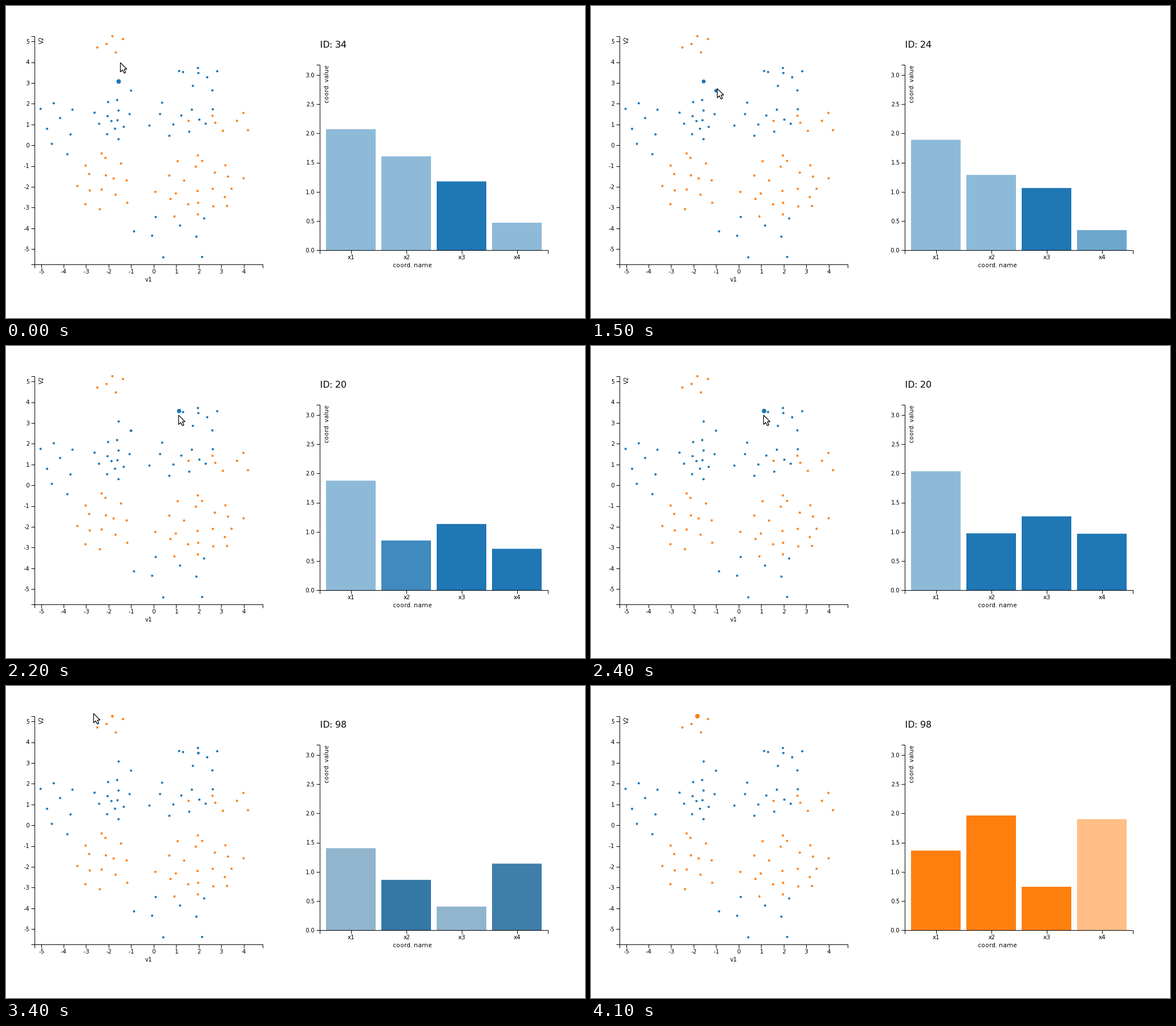
Animation, 1015 px wide and 547 px high, one loop 4.3 s. Source, as a matplotlib script:

```python
import numpy as np
import matplotlib.pyplot as plt
from matplotlib.animation import FuncAnimation
from matplotlib.colors import to_rgb
from matplotlib.patches import Polygon, Rectangle

W, H, DPI = 1015, 547, 100
PX = 72 / DPI  # points per pixel
STEP, LOOP = 100, 4300
HOLD = (2400, 3000)  # the scene clock stands still here, then jumps ahead
BAR_MS, GROW_MS, SHRINK_MS = 500, 400, 500
SMALL, LARGE = 2.0, 4.0
BLUE, ORANGE = np.array(to_rgb("#1f77b4")), np.array(to_rgb("#ff7f0e"))

# Whole-pixel glyph advances, as a browser sets small text.
plt.rcParams.update({"font.family": "DejaVu Sans", "text.hinting_factor": 1})

# Hover events: start, end, id, dot position, colour, signed coordinates.
# Negative coordinates are drawn as pale bars.
HOVERS = [
    (-1000, 1290, 34, (-1.567, 3.085), BLUE, (-2.077, -1.612, 1.182, -0.474)),
    (1290, 1880, 24, (-1.017, 2.64), BLUE, (-1.466, -0.5375, 0.801, 0.049)),
    (1906, 2660, 20, (1.12, 3.588), BLUE, (-2.042, 0.978, 1.269, 0.971)),
    (2660, 3085, 54, (1.975, 3.49), BLUE, (-1.413, 0.747, -0.372, 1.062)),
    (3255, LOOP, 98, (-1.845, 5.264), ORANGE, (1.368, 1.969, 0.7475, -1.9055)),
]

# Dot clouds: colour, count, centre, radii.
CLOUDS = [
    (BLUE, 13, (-1.85, 1.25), (0.85, 1.0)),
    (BLUE, 6, (2.1, 3.4), (0.95, 0.8)),
    (BLUE, 11, (1.1, 1.25), (1.75, 0.9)),
    (BLUE, 8, (-4.3, 1.1), (1.0, 1.6)),
    (BLUE, 8, (0.8, -4.2), (1.9, 1.4)),
    (ORANGE, 4, (-1.8, 4.8), (0.85, 0.55)),
    (ORANGE, 7, (3.0, 1.2), (1.5, 0.6)),
    (ORANGE, 23, (2.0, -2.0), (2.0, 1.8)),
    (ORANGE, 15, (-2.2, -1.7), (1.4, 1.6)),
]

# Pointer: where the tip rests first, then moves as start, end, destination.
REST = (200, 99)
MOVES = [
    (400, 800, (203, 133)), (1100, 1200, (207.5, 136)),
    (1200, 1700, (228, 149)), (1800, 2000, (302, 121)),
    (2900, 3000, (332, 101)), (3000, 3400, (153, 48)),
    (3500, 4000, (81, 1)),
]
POINTER_GONE = 4100
ARROW = np.array([(0.5, 0.3), (0.5, 16.5), (4.3, 13), (7, 18.6),
                  (9.7, 17.4), (7.2, 11.8), (11.8, 11.5)])


def scatter_x(v):
    return 259.3 + 39.45 * v


def scatter_y(v):
    return 244.6 - 36.4 * v


def bar_y(v):
    return 428.5 - 102.33 * v


def ease(t):
    """Cubic in-out, clamped to 0..1."""
    t = min(max(t, 0), 1)
    return 4 * t**3 if t < 0.5 else 1 - 4 * (1 - t) ** 3


def smooth(t):
    t = min(max(t, 0), 1)
    return t * t * (3 - 2 * t)


def cloud(rng, count, center, radii):
    """Jittered golden-angle spiral filling an ellipse."""
    k = np.arange(count)
    r = np.sqrt((k + 0.5) / count)
    angle = k * np.pi * (3 - np.sqrt(5)) + rng.uniform(0, 2 * np.pi)
    unit = np.column_stack([r * np.cos(angle), r * np.sin(angle)])
    unit += rng.uniform(-0.12, 0.12, unit.shape)
    return np.array(center) + unit * radii


fig = plt.figure(figsize=(W / DPI, H / DPI), dpi=DPI, facecolor="white")
ax = fig.add_axes([0, 0, 1, 1])
ax.set(xlim=(0, W), ylim=(H, 0))
ax.axis("off")


def line(xs, ys):
    # The offset makes snapping choose the pixel that holds the coordinate.
    ax.plot(np.array(xs) - 0.49, np.array(ys) - 0.49, color="black", lw=PX,
            solid_capstyle="butt", solid_joinstyle="miter", snap=True, zorder=2)


def label(x, y, text, size=10, ha="center", rotation=0):
    return ax.text(x, y, text, fontsize=size * PX, ha=ha, va="baseline",
                   rotation=rotation, rotation_mode="anchor", zorder=2)


def left_axis(x, top, bottom, ticks, name):
    line([x - 6, x, x, x - 6], [top, top, bottom, bottom])
    for y, text in ticks:
        line([x - 6, x], [y, y])
        label(x - 9, y + 3.4, text, ha="right")
    label(x + 15.5, top - 1, name, ha="right", rotation=90)


def bottom_axis(y, left, right, ticks, name, name_x):
    line([left, left, right, right], [y + 6, y, y, y + 6])
    for x, text in ticks:
        line([x, x], [y, y + 6])
        label(x, y + 15.6, text)
    label(name_x, y + 29.5, name)


left_axis(50.5, 53.5, 453.5,
          [(scatter_y(v), str(v)) for v in range(-5, 6)], "V2")
bottom_axis(453.5, 50.5, 450.5,
            [(scatter_x(v), str(v)) for v in range(-5, 5)], "v1", 250)
left_axis(550.5, 103.5, 428.5,
          [(bar_y(v), f"{v:.1f}") for v in np.arange(0, 3.1, 0.5)],
          "coord. value")
bottom_axis(428.5, 550.5, 950.5,
            [(605.5 + 97 * i, f"x{i + 1}") for i in range(4)],
            "coord. name", 713)
title = label(550, 73, "", size=16, ha="left")

bars = [ax.add_patch(Rectangle((561 + 97 * i, 428), 87, 0, lw=0, snap=False,
                               zorder=1)) for i in range(4)]

rng = np.random.default_rng(7)
clouds = [cloud(rng, *shape) for _, *shape in CLOUDS]
# Hovered dots come last, on top of the others.
places = np.vstack(clouds + [[hover[3] for hover in HOVERS]])
colors = [color for color, count, *_ in CLOUDS for _ in range(count)]
colors += [hover[4] for hover in HOVERS]
dots = ax.scatter(scatter_x(places[:, 0]), scatter_y(places[:, 1]), c=colors,
                  linewidths=0, zorder=3)
dots.set_snap(False)
shadow = ax.add_patch(Polygon(ARROW, fc="black", ec="none", alpha=0.25, zorder=4))
arrow = ax.add_patch(Polygon(ARROW, fc="white", ec="black", lw=1.2 * PX,
                             joinstyle="miter", zorder=5))


def draw_bars(clock):
    current = max(i for i, hover in enumerate(HOVERS) if hover[0] <= clock)
    start, _, name, _, color, coords = HOVERS[current]
    *_, old_color, old_coords = HOVERS[max(current - 1, 0)]
    p = ease((clock - start) / BAR_MS)
    title.set_text(f"ID: {name}")
    for bar, old, new in zip(bars, old_coords, coords):
        old_alpha, new_alpha = (0.5 if v < 0 else 1 for v in (old, new))
        top = bar_y(abs(old) + (abs(new) - abs(old)) * p)
        bar.set_y(top)
        bar.set_height(428.5 - top)
        bar.set_facecolor(old_color + (color - old_color) * p)
        bar.set_alpha(old_alpha + (new_alpha - old_alpha) * p)


def draw_dots(clock):
    radii = np.full(len(places), SMALL)
    for i, (start, end, *_) in enumerate(HOVERS):
        grown = ease((clock - start) / GROW_MS)
        shrunk = ease((clock - end) / SHRINK_MS)
        radii[i - len(HOVERS)] += (LARGE - SMALL) * grown * (1 - shrunk)
    dots.set_sizes((2 * radii * PX) ** 2)


def draw_pointer(clock):
    tip = np.array(REST, float)
    for start, end, goal in MOVES:
        tip += (np.array(goal) - tip) * smooth((clock - start) / (end - start))
    arrow.set_xy(ARROW + tip)
    shadow.set_xy(ARROW + tip + 1)
    for part in (arrow, shadow):
        part.set_visible(clock < POINTER_GONE)


def update(frame):
    clock = frame * STEP
    if HOLD[0] <= clock < HOLD[1]:
        clock = HOLD[0]
    draw_bars(clock)
    draw_dots(clock)
    draw_pointer(clock)
    return [*bars, dots, title, shadow, arrow]


anim = FuncAnimation(fig, update, frames=LOOP // STEP, interval=STEP,
                     repeat=True, repeat_delay=0, blit=False)
plt.show()
```
